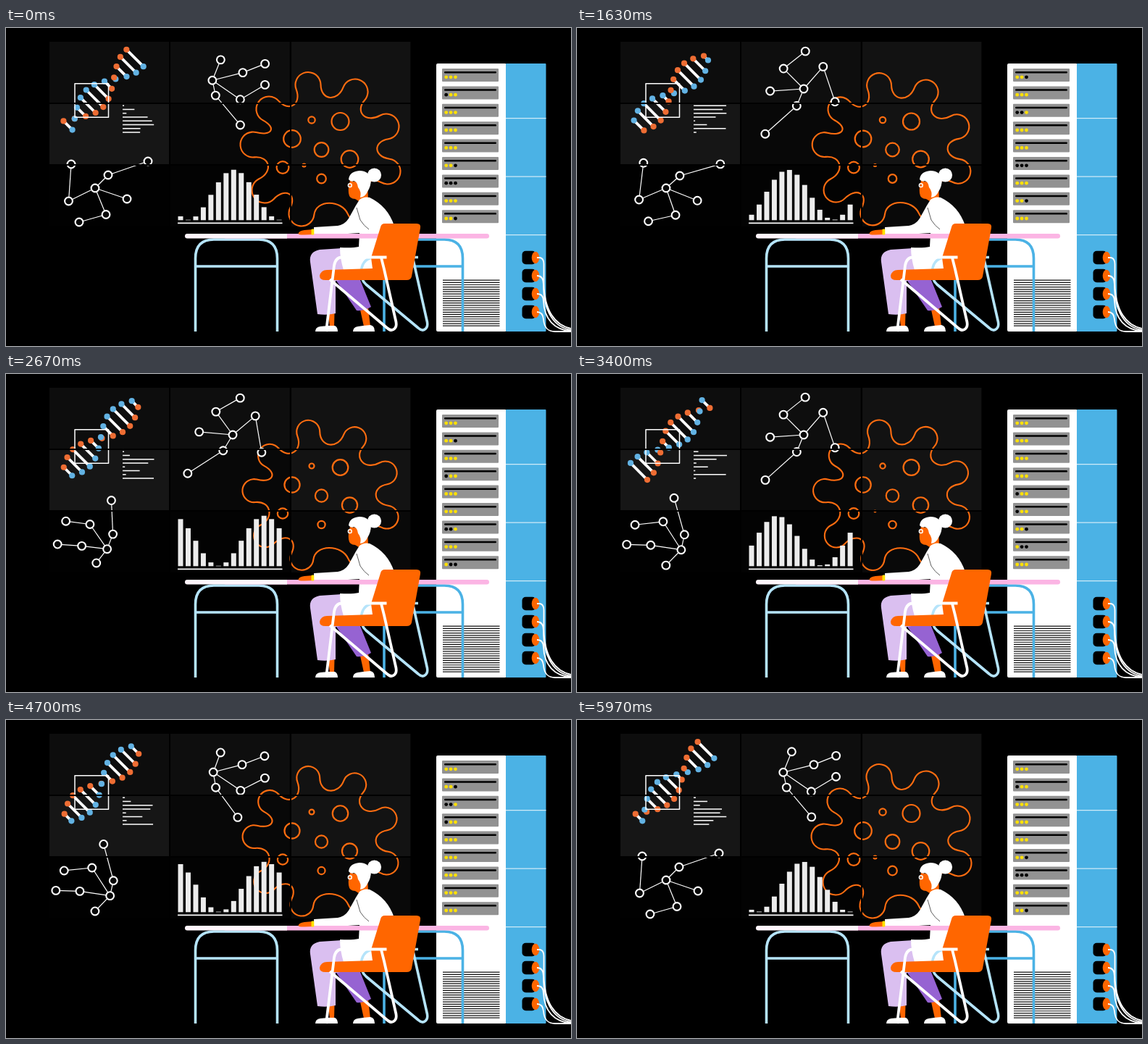
Recreate the animation shown at these times as an HTML page with a canvas. Size 780 by 439 pixels, loop 6.01 s.

```html
<!DOCTYPE html>
<html lang="en">
<head>
<meta charset="utf-8">
<title>Research desk</title>
<style>
html, body { margin: 0; width: 100%; height: 100%; overflow: hidden; background: #000; }
canvas { display: block; width: 780px; height: 439px; }
</style>
</head>
<body>
<canvas id="stage" width="780" height="439"></canvas>
<script>
const g = document.getElementById('stage').getContext('2d');
const LOOP = 6010, TAU = Math.PI * 2, DEG = TAU / 360;
const ORANGE = '#ff6600', BLUE = '#4bb2e5', PALE = '#b5e4fa', WHITE = '#fff';

const lerp = (a, b, p) => a + (b - a) * p;
const mod = (a, n) => ((a % n) + n) % n;
const rnd = n => mod(Math.sin(n * 12.9898) * 43758.5453, 1);
// Most parts share a cycle that runs three times per loop
const turn = t => TAU * 3 * t / LOOP;
const swing = t => (1 - Math.cos(turn(t))) / 2;

function box(color, x, y, w, h, r = 0) {
  g.fillStyle = color;
  g.beginPath();
  g.roundRect(x, y, w, h, r);
  g.fill();
}
function disc(color, x, y, rx, ry = rx) {
  g.fillStyle = color;
  g.beginPath();
  g.ellipse(x, y, rx, ry, 0, 0, TAU);
  g.fill();
}
function ring(color, x, y, r, w) {
  g.strokeStyle = color;
  g.lineWidth = w;
  g.beginPath();
  g.arc(x, y, r, 0, TAU);
  g.stroke();
}
function line(color, w, x1, y1, x2, y2) {
  g.strokeStyle = color;
  g.lineWidth = w;
  g.beginPath();
  g.moveTo(x1, y1);
  g.lineTo(x2, y2);
  g.stroke();
}
function fill(color, d) {
  g.fillStyle = color;
  g.fill(new Path2D(d));
}
function stroke(color, w, d) {
  g.strokeStyle = color;
  g.lineWidth = w;
  g.stroke(new Path2D(d));
}

// Wall of screens, one grey level each
const GREYS = [13, 14, 18, 22, 8, 19, 1, 3, 9];
function drawScreens() {
  GREYS.forEach((v, i) => {
    const x = 60 + i % 3 * 166.7, y = 19 + Math.floor(i / 3) * 85.5;
    box(`rgb(${v},${v},${v})`, x, y, 165, 84);
  });
}
function drawGaps() {
  for (const x of [225, 392]) box('#000', x, 19, 2, 256);
  for (const y of [103, 188]) box('#000', 60, y, 499, 2);
}

function drawHelix(t) {
  const rungs = [];
  for (let k = 0; k < 11; k++) {
    const a = 0.54 * (k - 1) - turn(t);
    rungs.push({ x: 85.5 + 9.25 * k, y: 134.5 - 9.3 * k, a, d: 11.8 * Math.sin(a) });
  }
  for (const { x, y, d } of rungs) line(WHITE, 3.8, x - d, y - d, x + d, y + d);
  for (const { x, y, a, d } of rungs) {
    const dots = [['#ee6d33', d], ['#62b2e3', -d]];
    if (Math.cos(a) < 0) dots.reverse();
    for (const [color, s] of dots) disc(color, x + s, y + s, 4.1);
  }
  g.strokeStyle = WHITE;
  g.lineWidth = 1.5;
  g.strokeRect(95, 76.7, 46.5, 46.5);
}

function drawTextLines(t) {
  for (let row = 0; row < 8; row++) {
    const speed = 1 + Math.floor(3 * rnd(row + 1));
    const w = 24 + 22 * Math.sin(speed * turn(t) + TAU * rnd(row + 20));
    box(WHITE, 161, 106.4 + row * 5.27, w, 1.5);
  }
}

// Node graph: x,y pairs around a pivot. It rocks at rest, then cuts to an open pose.
const EDGES = [[0, 1], [0, 2], [2, 3], [0, 4], [4, 5], [0, 6], [6, 7]];
const REST = [0, 0, 44, 15, 15, 36.5, -22, 47, 18, -18, 73, -37, -36.5, 18, -33, -33];
const OPEN = [22, 22, -0.7, 44, -22, 15, -55, 14.5, 25.5, 1, 8, -50.6, -3.3, -18.2, -43.6, -11.4];
const FOLD = [16, 20.5, 2, 39.5, -18, 16.5, -51.5, 14, 24.5, 0, 24, -46, -7.5, -13, -40, -18.5];
function drawGraph(time, px, py, degrees) {
  const s = mod(time, LOOP);
  const open = s >= 2605 && s < 5610;
  const fold = ((s - 4020) / 1420) ** 2;
  const pose = open ? OPEN.map((v, i) => lerp(v, FOLD[i], fold)) : REST;
  const a = (degrees + (open ? 0 : 10 * swing(s))) * DEG;
  const nodes = [];
  for (let i = 0; i < pose.length; i += 2) {
    const x = pose[i], y = pose[i + 1];
    nodes.push([px + x * Math.cos(a) - y * Math.sin(a), py + x * Math.sin(a) + y * Math.cos(a)]);
  }
  for (const [from, to] of EDGES) line(WHITE, 1.2, ...nodes[from], ...nodes[to]);
  for (const [x, y] of nodes) {
    disc('#080808', x, y, 5.4);
    ring(WHITE, x, y, 5.4, 2.1);
  }
}

const LOBES = [[417, 78.5], [482, 88], [525, 136], [527, 198], [488, 250],
  [408, 256], [357, 224], [341, 161], [363, 112]];
const CELLS = [[422, 127, 4.7], [461.5, 129, 12], [395, 153, 11.8], [435.5, 168, 9.8],
  [474.5, 181, 11.8], [382, 192.5, 8.4], [435.5, 208, 6.3], [411.5, 189.5, 2]];
function drawVirus(t) {
  const u = swing(t), cx = 434, cy = 168, r = 17.5 - 2 * u, pull = 22;
  const bend = 100 * DEG;
  const lobes = LOBES.map(([x, y]) => ({
    x: lerp(x, cx, 0.02 * u), y: lerp(y, cy, 0.02 * u), a: Math.atan2(y - cy, x - cx)
  }));
  g.strokeStyle = '#ff6d10';
  g.lineWidth = 2.1;
  g.beginPath();
  lobes.forEach((l, i) => {
    const m = lobes[(i + 1) % lobes.length];
    const end = l.a + bend, start = m.a - bend;
    const ex = l.x + r * Math.cos(end), ey = l.y + r * Math.sin(end);
    const sx = m.x + r * Math.cos(start), sy = m.y + r * Math.sin(start);
    g.arc(l.x, l.y, r, l.a - bend, end);
    g.bezierCurveTo(ex - pull * Math.sin(end), ey + pull * Math.cos(end),
      sx + pull * Math.sin(start), sy - pull * Math.cos(start), sx, sy);
  });
  g.closePath();
  g.stroke();
  for (const [x, y, size] of CELLS) {
    const cell = size - 1.6 * u;
    if (cell > 0.9) ring('#ff6d10', x, y, cell, 2.2);
  }
}

function drawBars(t) {
  const peak = 7 + 36 * t / LOOP;
  for (let k = 0; k < 14; k++) {
    const h = 0.6 + 69 * (1 + Math.cos(Math.PI / 6 * (k - peak))) / 2;
    box('#ececec', 237.5 + 10.47 * k, 265.3 - h, 7, h);
  }
  box(WHITE, 237, 268.6, 144.5, 1.7);
}

// Lights stay full, then empty and refill from the left
function isLit(row, i, t) {
  const p = mod(t / LOOP * (2 + row % 2) + rnd(row + 5), 1);
  const step = Math.max(0, Math.ceil((p - 0.6) / 0.08));
  return step <= 3 ? i >= step : i < step - 3;
}
function drawServer(t) {
  box(WHITE, 594, 49, 97, 370, 2);
  box(BLUE, 690, 49, 55.5, 370, 1);
  for (const y of [124, 204.5, 285]) box('#cfeaf8', 690, y, 55.5, 1.2);
  for (let row = 0; row < 9; row++) {
    const y = 56 + 24.4 * row;
    box('#929292', 602, y, 78, 18, 1);
    box('#000', 605, y + 3.9, 72, 2.5, 1.2);
    for (let i = 0; i < 3; i++) {
      disc(isLit(row, i, t) ? '#ffe100' : '#000', 607.7 + 6.4 * i, y + 11.8, 2.4);
    }
  }
  for (let i = 0; i < 21; i++) box('#111', 603, 347.6 + 3.15 * i, 78.5, 1.2);
  for (let i = 0; i < 4; i++) {
    const y = 317 + 25 * i;
    box('#000', 712.5, y - 9.2, 19, 18.4, 5);
    disc(ORANGE, 731, y, 5.3, 8.3);
  }
  stroke(WHITE, 1.8, `M733 317H737Q742.5 318 742.5 326V352C743 390 758 411 781 415
    M733 342Q742 342 742 354C742 392 757 414 781 417
    M733 367Q742 367 742 377C743 402 757 417 781 418.5
    M733 392Q741 392 742 402C743 414 748 419 758 419H781`);
}

function drawDesk() {
  box('#fbb5e4', 300, 284, 367, 6.6, 3.3);
  box('#fff5fb', 247, 284, 141, 6.6, [3.3, 0, 0, 3.3]);
}
function drawDeskLegs() {
  stroke(BLUE, 3.6, 'M522 419V318Q522 292 548 292H605Q630.5 292 630.5 318V419M522 329H630');
  stroke(PALE, 3.6, 'M261.5 419V318Q261.5 292 287 292H349Q374.5 292 374.5 318V419M261.5 329H374');
}

function drawWoman() {
  g.lineJoin = 'round';
  // far leg
  fill(ORANGE, 'M489 389L500 386L503 412H494Z');
  fill('#9663d2', 'M452 343H487L504 385Q494 391 484 390Z');
  fill(WHITE, 'M479 419Q479 413 486 412L493 411L503 410Q509 411 509 419Z');
  // near leg
  fill(ORANGE, 'M445 393H453.5L453 413H447Z');
  fill('#dabff0', 'M464 304L433 306Q418 309 420 323L430 395Q443 397 455 394L455 349L500 342V305Z');
  fill(WHITE, 'M427 419Q427 413 434 412L445 411H454Q458 413 458 419Z');
  // head
  fill(ORANGE, 'M475 211Q472 220 473 228Q474 236 482 236L487 239L500 237L499 215Z');
  disc(WHITE, 508.5, 203, 9.6);
  fill(WHITE, `M473 209Q474 198 488 197Q501 197 504 209Q504 218 499 226
    Q496 233 489 234Q491 226 486 220Q485 212 480 211Q476 213 473 209Z`);
  ring(WHITE, 474.8, 217.2, 2.4, 1.5);
  // shirt and arm
  fill(WHITE, `M488 237Q494 232 502 234Q527 246 536 273L520 334H466Q461 318 461 303
    Q478 304 487 302L488 283L472 284H425V275L458 273Q468 271 473 263L483 245Z`);
  stroke('#333', 0.8, 'M484 248L489 265Q494 273 501 278');
  drawDesk();
  fill(ORANGE, 'M424 278L412 279Q404 280 403.5 284Q405 286 412 285.5L425 285Z');
  box('#ffe100', 421.5, 277.5, 3.8, 8, 1.2);
  // far chair frame
  stroke(PALE, 3.6, `M569 316.5H510Q493 317 490.5 334Q489 347 497 354L569 414
    Q575 419.5 579.5 415Q582.5 412 581.5 406L561.5 317`);
  // seat
  fill(ORANGE, `M523 270H567Q573 270 572 276L560 343Q559 348 553 348H441
    Q433 348 433 342Q435 334 443 334L506 332L504 317L517 275Q518 270 523 270Z`);
  // near chair frame
  stroke(WHITE, 3.8, `M442 419L453 328Q455 316.5 464 316.5H525.5
    M447 347L526 414Q532 419.5 536.5 415Q539.5 412 538.5 406L522 333L518 317`);
}

function draw(t) {
  g.fillStyle = '#000';
  g.fillRect(0, 0, 780, 439);
  drawScreens();
  drawHelix(t);
  drawTextLines(t);
  drawVirus(t);
  drawGraph(t - 1500, 313, 84, 157);
  drawGraph(t, 123, 221, 0);
  drawBars(t);
  drawGaps();
  drawServer(t);
  drawDeskLegs();
  drawWoman();
}

const begin = performance.now();
function tick() {
  draw((performance.now() - begin) % LOOP);
  requestAnimationFrame(tick);
}
tick();
</script>
</body>
</html>
```
